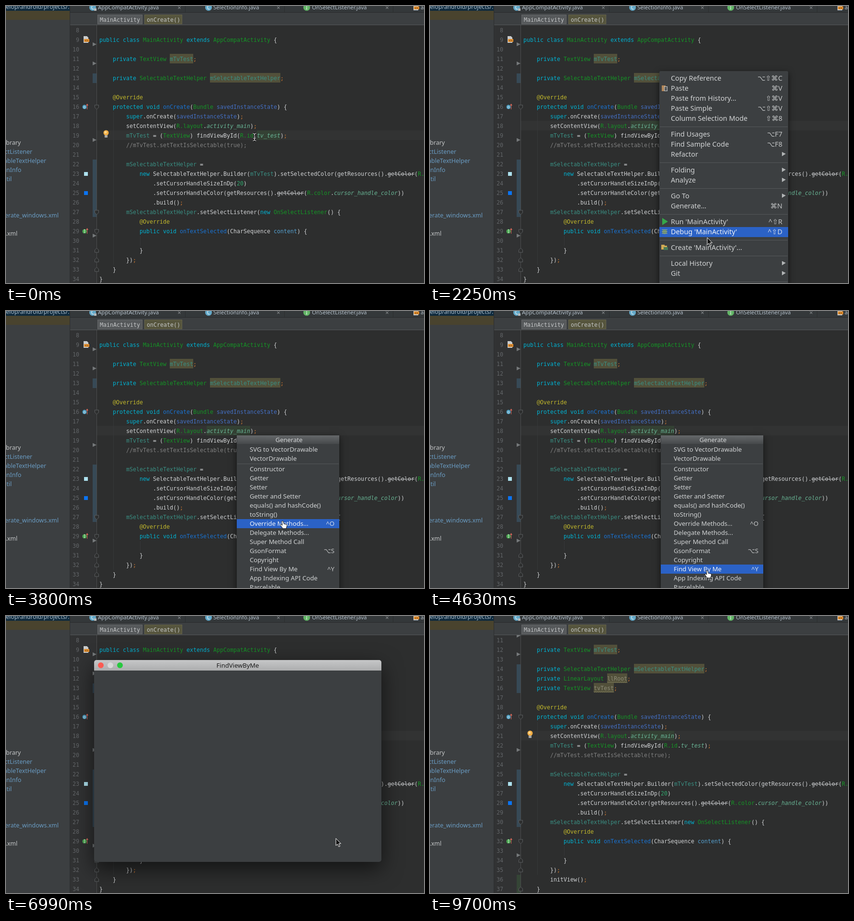
Write an HTML page with a canvas that moves like this. It is 873x579 px and loops after 9.82 s.

```html
<!DOCTYPE html>
<html lang="en">
<head>
<meta charset="utf-8">
<title>Code editor</title>
<style>
html, body { margin: 0; width: 100%; height: 100%; overflow: hidden; background: #2b2b2b; }
canvas { display: block; }
</style>
</head>
<body>
<canvas id="stage" width="873" height="579"></canvas>
<script>
const ctx = document.getElementById('stage').getContext('2d');
const LOOP = 9820, CHAR = 7, CODE_X = 195, ROW = 20;
const MONO = '11.63px "DejaVu Sans Mono", monospace';
const ui = size => `${size}px "Noto Sans", "DejaVu Sans", sans-serif`;

// Each token starts with its style letter; tokens are separated by "|".
const STYLES = {
  d: '#d0d2d4', k: '#00b2d2', c: '#159426', f: '#3a8f83', h: '#3a8f83', a: '#c2b82c',
  m: '#1a73d2', p: '#446fc4', q: '#55a0cf', g: '#808080', n: '#2fa56c', o: '#cc7832',
  i: '#68b494', s: '#c4c6c8', u: '#8c8b78'
};
const textField = '    |kprivate |cTextView |hmTvTest|o;';
const helperField = '    |kprivate |cSelectableTextHelper |hmSelectableTextHelper|o;';
const body = [
  '',
  '    |a@Override',
  '    |kprotected void |monCreate|d(|cBundle |psavedInstanceState|d) {',
  '        |ksuper|d.onCreate(|psavedInstanceState|d)|o;',
  '        |dsetContentView(|cR.layout|d.|iactivity_main|d)|o;',
  '        |fmTvTest |d= (|cTextView|d) findViewById(|cR.id|d.|itv_test|d)|o;',
  '        |g//mTvTest.setTextIsSelectable(true);',
  '',
  '        |fmSelectableTextHelper |d=',
  '            |knew |dSelectableTextHelper.Builder(|fmTvTest|d).setSelectedColor(getResources().|sgetColor|d(|cR.color',
  '                |d.setCursorHandleSizeInDp(|n20|d)',
  '                |d.setCursorHandleColor(getResources().|sgetColor|d(|cR.color|d.|icursor_handle_color|d))',
  '                |d.build()|o;',
  '        |fmSelectableTextHelper|d.setSelectListener(|knew |cOnSelectListener|d() {',
  '            |a@Override',
  '            |kpublic void |monTextSelected|d(CharSequence |qcontent|d) {',
  '',
  '            |d}',
  '        |d})|o;'
];
const linesBefore = ['', 'kpublic class |cMainActivity |kextends |cAppCompatActivity |d{', '',
  textField, '', helperField, ...body, '    |d}', 'd}'];
const linesAfter = resolved => ['', textField, '', helperField,
  resolved ? '    |kprivate |cLinearLayout |ullRoot|o;' : '    |kprivate |dLinearLayout llRoot|o;',
  resolved ? '    |kprivate |cTextView |utvTest|o;' : '    |kprivate |dTextView tvTest|o;',
  ...body, '        |dinitView()|o;', '    |d}'];

// Context menu rows: label, shortcut or ">" for a submenu; "-" is a separator.
const MENU = ['Copy Reference|⌥⇧⌘C', 'Paste|⌘V', 'Paste from History...|⇧⌘V', 'Paste Simple|⌥⇧⌘V',
  'Column Selection Mode|⇧⌘8', '-', 'Find Usages|⌥F7', 'Find Sample Code|⌥F8', 'Refactor|>', '-',
  'Folding|>', 'Analyze|>', '-', 'Go To|>', 'Generate...|⌘N', '-', "Run 'MainActivity'|^⇧R",
  "Debug 'MainActivity'|^⇧D", '-', "Create 'MainActivity'...", '-', 'Local History|>', 'Git|>', '-'];
const POPUP = ['SVG to VectorDrawable', 'VectorDrawable', '-', 'Constructor', 'Getter', 'Setter',
  'Getter and Setter', 'equals() and hashCode()', 'toString()', 'Override Methods...|^O',
  'Delegate Methods...', 'Super Method Call', 'GsonFormat|⌥S', 'Copyright', 'Find View By Me|^Y',
  'App Indexing API Code', 'Parcelable'];

// Pointer moves: start, end, number of steps, x, y.
const MOVES = [
  [60, 240, 3, 478, 252], [1750, 1930, 3, 583, 479], [2250, 2250, 1, 579, 484],
  [2310, 2550, 4, 577, 409], [3120, 3120, 1, 577, 415], [3650, 4630, 16, 578, 542],
  [5530, 5530, 1, 578, 539], [6100, 6400, 6, 640, 440], [6460, 6650, 4, 671, 457],
  [6830, 7050, 5, 701, 470], [7100, 7280, 4, 681, 486], [7820, 7820, 1, 681, 490],
  [8260, 8640, 5, 790, 524], [8790, 9170, 6, 838, 602]
];

function rect(x, y, w, h, color) {
  ctx.fillStyle = color;
  ctx.fillRect(x, y, w, h);
}
function poly(color, ...points) {
  ctx.beginPath();
  for (let i = 0; i < points.length; i += 2) ctx.lineTo(points[i], points[i + 1]);
  ctx.closePath();
  ctx.fillStyle = color;
  ctx.fill();
}
function outline(color, width = 1) {
  ctx.strokeStyle = color;
  ctx.lineWidth = width;
  ctx.stroke();
}
function disc(x, y, r, color) {
  ctx.beginPath();
  ctx.arc(x, y, r, 0, Math.PI * 2);
  ctx.fillStyle = color;
  ctx.fill();
}
function label(text, x, y, color, font, align = 'left') {
  ctx.font = font;
  ctx.textAlign = align;
  ctx.fillStyle = color;
  ctx.fillText(text, x, y);
}
function gradient(y, h, from, to) {
  const g = ctx.createLinearGradient(0, y, 0, y + h);
  g.addColorStop(0, from);
  g.addColorStop(1, to);
  return g;
}
function panel(x, y, w, h, color, blur, offset, radius = 0) {
  ctx.save();
  ctx.shadowColor = 'rgba(0,0,0,.6)';
  ctx.shadowBlur = blur;
  ctx.shadowOffsetY = offset;
  ctx.beginPath();
  ctx.roundRect(x, y, w, h, radius);
  ctx.fillStyle = color;
  ctx.fill();
  ctx.restore();
}
function faded(alpha, draw) {
  if (!alpha) return;
  ctx.save();
  ctx.globalAlpha = alpha;
  draw();
  ctx.restore();
}

function pointerAt(t) {
  let x = 519, y = 274;
  for (const [start, end, steps, toX, toY] of MOVES) {
    if (t < start) break;
    const done = end > start ? Math.floor((t - start) / (end - start) * (steps - 1) + 1e-6) + 1 : steps;
    const p = Math.min(done, steps) / steps;
    x += (toX - x) * p;
    y += (toY - y) * p;
  }
  return { x, y };
}

function drawSidebar() {
  rect(0, 0, 133, 579, '#3c3f41');
  rect(0, 0, 133, 10, '#0f2a3d');
  rect(0, 10, 133, 19, '#49432e');
  label('elop/android/projects/.', 0, 6, '#a9bccb', ui(12.2));
  const files = [['library', 31, 286, '#c4c6c7'], ['SelectListener', 55, 305], ['SelectableTextHelper', 84, 324],
    ['SelectionInfo', 32, 343], ['TextUtil', 12, 362], ['operate_windows.xml', 110, 438], ['colors.xml', 24, 476, '#c4c6c7']];
  for (const [name, right, y, color = '#6a9cc3'] of files) label(name, right, y + 4, color, ui(12.5), 'right');
  rect(133, 0, 1, 579, '#2a2c2d');
}

function fileIcon(x, y) {
  poly('#c9cccd', x, y, x + 7, y, x + 10, y + 3, x + 10, y + 14, x, y + 14);
  rect(x + 1, y + 6, 11, 6, '#e5902f');
  label('<>', x + 6.5, y + 11.5, '#4a2f10', ui(7), 'center');
}

function drawTabs() {
  rect(134, 0, 739, 14, '#34383a');
  const tabs = [[181, 192, 'AppCompatActivity.java', 362, 'C', '#63a9c9'], [423, 433, 'SelectionInfo.java', 569, 'C', '#63a9c9'],
    [628, 639, 'OnSelectListener.java', 796, 'I', '#62b566']];
  for (const [iconX, x, name, closeX, letter, color] of tabs) {
    disc(iconX, 3, 7, color);
    label(letter, iconX, 7, '#fff', ui(10), 'center');
    label(name, x, 7, '#b4c0cb', ui(11.5));
    label('×', closeX, 8, '#8b8f92', ui(13), 'center');
    rect(closeX + 12, 0, 1, 13, '#2b2d2e');
  }
  rect(184, 5, 5, 5, '#b5b8ba');
  fileIcon(851, -5);
  label('activity_main.xml', 866, 7, '#b4c0cb', ui(11.5));
  rect(134, 13, 739, 1, '#282a2b');
  rect(134, 14, 739, 26, '#3c3f41');
  rect(134, 39, 739, 1, '#55585a');
  const crumbs = [[191, 94, 'MainActivity', '#56595b', '#67696b'], [289, 79, 'onCreate()', '#56553d', '#66644b']];
  for (const [x, w, name, fill, border] of crumbs) {
    rect(x, 18, w, 20, border);
    rect(x + 1, 19, w - 2, 18, fill);
    label(name, x + 5, 33, '#c3c5c6', MONO);
  }
}

function overrideIcon(y, color, letter) {
  disc(164, y, 4.5, color);
  label(letter, 164, y + 3, '#fff', ui(8), 'center');
  rect(169, y - 4, 1, 9, '#d9695c');
  poly('#d9695c', 169.5, y - 7, 172, y - 3, 167, y - 3);
}

function drawGutter(after) {
  rect(134, 40, 55, 539, '#313233');
  const marks = after ? [[101, 60], [321, 120]] : [[141, 20], [321, 120]];
  for (const [y, h] of marks) rect(181, y, 8, h, '#374956');
  if (after) rect(181, 541, 8, 38, '#354536');
  rect(189, 40, 1, 539, '#4b4d4e');
  for (const y of after ? [41, 80, 280, 500] : [80, 120, 280, 480]) poly('#75787a', 181, y - 4, 189, y, 181, y + 4);
  const fold = (y, s) => {
    poly('#2d2e2e', 185.5, y - 4 * s, 193.5, y - 4 * s, 193.5, y + s, 189.5, y + 5 * s, 185.5, y + s);
    outline('#5b5e60');
  };
  for (const y of [211, 431, 471]) fold(y, 1);
  for (const y of [511, 531, after ? 571 : 551]) fold(y, -1);
  if (!after) fileIcon(162, 63);
  overrideIcon(211, '#4b9cc0', 'o');
  overrideIcon(471, '#4da853', 'I');
  rect(163, 347, 8, 8, '#ade1ee');
  rect(163, 387, 8, 8, '#0b74f2');
}

function drawBulb(y) {
  disc(209, y - 2, 5.5, '#f2ae45');
  disc(208, y - 3, 2.5, '#ffd890');
  rect(206, y + 3, 6, 5, '#a3a5a6');
}

function drawLine(line, y) {
  let x = CODE_X;
  for (const token of line.split('|')) {
    if (!token.trim()) { x += token.length * CHAR; continue; }
    const style = token[0], text = token.slice(1), w = text.length * CHAR;
    if (style === 'h' || style === 'u') rect(x, y - 11, w, ROW, '#52503a');
    label(text, x, y + 4, STYLES[style], (style === 'i' ? 'italic ' : '') + MONO);
    if (style === 's') rect(x, y, w, 1, STYLES.s);
    if (style === 'u') {
      ctx.beginPath();
      for (let i = 0; i <= w; i += 2) ctx.lineTo(x + i, y + 6.5 + (i / 2 % 2) * 2);
      outline('#8e8a68');
    }
    x += w;
  }
}

function drawEditor(t) {
  const after = t >= 7910;
  rect(134, 40, 739, 539, '#2d2e2e');
  rect(190, t < 420 ? 260 : 240, 683, ROW, '#323333');
  rect(224, 221, 1, 320, '#363839');
  rect(280, 481, 1, 20, '#363839');
  if (t < 860) rect(524, 260, 49, ROW, '#344134');
  else rect(419, 240, 91, ROW, '#344134');
  drawGutter(after);
  const lines = after ? linesAfter(t >= 8260) : linesBefore;
  lines.forEach((line, i) => {
    const y = 51 + i * ROW;
    label(i + (after ? 11 : 8), 153, y + 4, '#626568', MONO, 'right');
    drawLine(line, y);
  });
  if (t >= 60 && t < 420) rect(545, 260, 1, ROW, '#d0d0d0');
  if (t >= 530 && t < 1210 || t >= 9170 && t < 9340 || t >= 9520 && t < 9700) rect(481, 240, 2, ROW, '#c8c8c8');
  if (t < 420) drawBulb(267);
  if (t >= 1210 && t < 1310 || t >= 9100) drawBulb(247);
}

function layoutRows(items, firstY, step, gap) {
  let y = firstY;
  const rows = [], separators = [];
  for (const item of items) {
    if (item === '-') {
      separators.push(y - step / 2 + gap / 2);
      y += gap;
    } else {
      const [name, key = ''] = item.split('|');
      rows.push({ name, key, y });
      y += step;
    }
  }
  return { rows, separators };
}
const menuLayout = layoutRows(MENU, 151, 21, 12);
const popupLayout = layoutRows(POPUP, 289, 19, 3);
const nearest = (rows, y) => rows.reduce((a, b) => Math.abs(b.y - y) < Math.abs(a.y - y) ? b : a);

function drawList({ rows, separators }, active, box) {
  const { x, w, textX, keyX, step, font } = box;
  for (const y of separators) rect(x + 1, Math.round(y), w - 2, 1, '#55585a');
  for (const row of rows) {
    const on = row === active;
    if (on) rect(x, Math.round(row.y - step / 2), w, step, '#2b62c6');
    label(row.name, textX, row.y + 5, on ? '#f2f4f8' : '#d2d4d5', font);
    if (row.key === '>') poly('#b2b5b6', keyX - 1, row.y - 5, keyX + 7, row.y - 1, keyX - 1, row.y + 4);
    else label(row.key, keyX, row.y + 5, on ? '#d3dcec' : '#c3c5c6', font, 'right');
  }
}

function drawMenu(pointer) {
  panel(479, 136, 269, 460, '#3c3f41', 14, 4, 3);
  const active = pointer.x > 479 && nearest(menuLayout.rows, pointer.y);
  drawList(menuLayout, active, { x: 479, w: 269, textX: 503, keyX: 736, step: 21, font: ui(14.4) });
  rect(484, 166, 8, 12, '#b0865a');
  rect(489, 168, 7, 10, '#c6c9ca');
  rect(490, 169, 5, 8, '#55585a');
  poly('#35a849', 485, 443, 497, 450.5, 485, 458);
  disc(490, 472, 5, '#6c8f70');
  for (const dy of [-4, 0, 4]) rect(484, 471 + dy, 12, 1, '#93a893');
  rect(483, 499, 7, 3, '#d0ab55');
  rect(483, 501, 12, 8, '#d0ab55');
  rect(488, 504, 9, 6, '#487b59');
}

function drawPopup(pointer, t) {
  panel(482, 260, 214, 340, '#3c3f41', 14, 4);
  rect(482, 260, 214, 18, gradient(260, 18, '#65686a', '#46494b'));
  label('Generate', 591, 274, '#d4d6d7', ui(13), 'center');
  const active = t < 3650 ? popupLayout.rows[0] : nearest(popupLayout.rows, pointer.y);
  drawList(popupLayout, active, { x: 482, w: 214, textX: 509, keyX: 686, step: 19, font: ui(13.15) });
}

function drawDialog() {
  panel(184, 92, 600, 422, '#3c3f41', 44, 14, 5);
  ctx.beginPath();
  ctx.roundRect(184, 92, 600, 22, [5, 5, 0, 0]);
  ctx.fillStyle = gradient(92, 22, '#c6c7c8', '#acadae');
  ctx.fill();
  ['#fc5b52', '#d8d8d8', '#28c83f'].forEach((color, i) => disc(198 + i * 20, 103, 6, color));
  label('FindViewByMe', 484, 108, '#1c1c1c', ui(13), 'center');
}

function drawPointer({ x, y }, t) {
  ctx.save();
  ctx.translate(x, y);
  ctx.lineJoin = 'round';
  if (t >= 3320 && t < 5530) {
    poly('#fff', 0, 0, 2, 1, 3, 6, 8, 7, 10, 9, 8, 16, 1, 16, -4, 9, -3, 7, 0, 9, -1, 1);
    outline('#111');
  } else if (t >= 1310 && t < 3120 || t >= 5530 && t < 7820) {
    poly('#111', 0, 0, 0, 15, 3.5, 12, 6, 17.5, 8.5, 16.5, 6, 11, 10.5, 11);
    outline('#fff');
  } else {
    for (const [color, width] of [['#111', 3], ['#fff', 1]]) {
      ctx.beginPath();
      ctx.moveTo(-3.5, -8); ctx.quadraticCurveTo(0, -8, 0, -5);
      ctx.quadraticCurveTo(0, -8, 3.5, -8);
      ctx.moveTo(0, -5); ctx.lineTo(0, 5);
      ctx.moveTo(-3.5, 8); ctx.quadraticCurveTo(0, 8, 0, 5);
      ctx.quadraticCurveTo(0, 8, 3.5, 8);
      ctx.moveTo(-2.5, 2.5); ctx.lineTo(2.5, 2.5);
      outline(color, width);
    }
  }
  ctx.restore();
}

function draw(t) {
  const pointer = pointerAt(t);
  const during = (start, end) => t >= start && t < end;
  drawEditor(t);
  drawTabs();
  drawSidebar();
  faded(during(1310, 1410) ? 0.6 : during(1410, 3120) ? 1 : during(3120, 3170) ? 0.4 : 0, () => drawMenu(pointer));
  faded(during(3230, 3320) ? 0.6 : during(3320, 5530) ? 1 : 0, () => drawPopup(pointer, t));
  faded(during(5530, 5620) ? 0.6 : during(5620, 7820) ? 1 : 0, drawDialog);
  drawPointer(pointer, t);
}

const started = performance.now();
function tick() {
  draw((performance.now() - started) % LOOP);
  requestAnimationFrame(tick);
}
tick();
</script>
</body>
</html>
```
